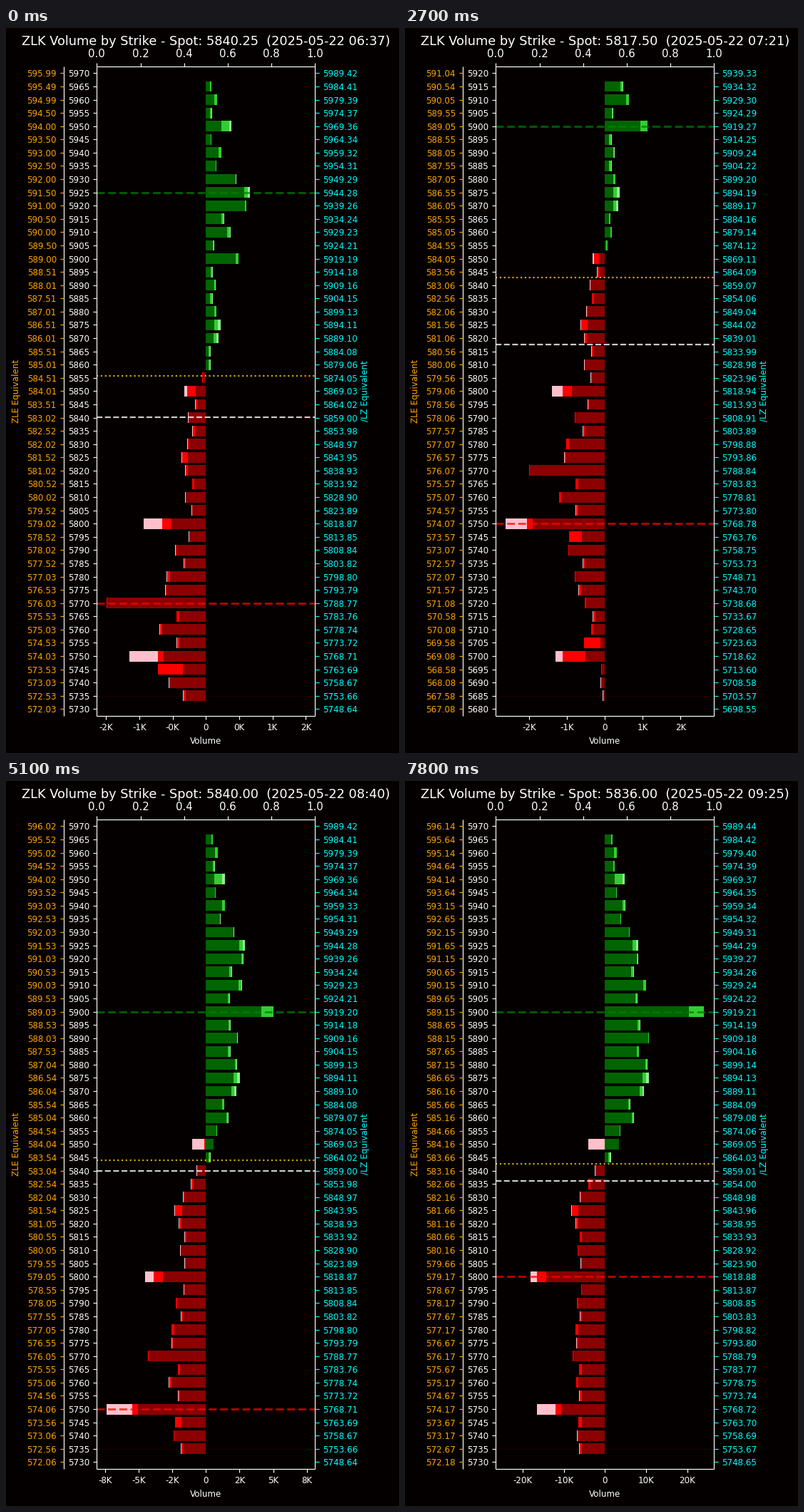
Animation of 551 by 1017 pixels, one loop 8 s. Source, as a matplotlib script:

```python
import matplotlib.pyplot as plt
import numpy as np
from matplotlib.animation import FuncAnimation
from matplotlib.collections import LineCollection, PolyCollection

W, H, DPI = 551, 1017, 128
PX = 72 / DPI                       # points per pixel
LEFT, RIGHT, TOP, BOTTOM = 127.3, 433.3, 54.1, 964.7
SIDE = 81.3                         # second axis on the left
ZERO, HALF = (LEFT + RIGHT) / 2, (RIGHT - LEFT) / 2
ROWS, GAP = 49, 5
ROW = (BOTTOM - TOP) / ROWS
TICK, PAD = 5.2, 10.4
SMALL, MEDIUM, LARGE = 11.89, 14.86, 17.83
BG = "#050000"
CALLS = ["darkgreen", "limegreen", "lightgreen"]
PUTS = ["darkred", "red", "pink"]
STEP_MS, TICK_MS, FRAMES = 300, 100, 80
CARRY = 19                          # future minus spot

# Market state at a few steps, linear in between
STEPS = (0, 5, 9, 15, 20, 23, 26)
MINUTES = (397, 422, 441, 510, 535, 550, 565)
SPOT = (5840.25, 5823.25, 5817.5, 5836.5, 5845.25, 5855, 5836)
FUND = (583.04, 581.44, 580.81, 582.65, 583.63, 584.53, 582.76)
FLIP = (5855.8, 5842.5, 5842.8, 5841.4, 5847.85, 5852.2, 5842.5)
PIVOT = (5857, 5852, 5852, 5847, 5838, 5839, 5843)
LIMIT = (1638, 2395, 2882, 4483, 13570, 19860, 26520)

# Middle and far parts of strikes with wider tips
TIPS = {5925: (5, 3), 5875: (5, 4), 5870: (4, 3), 5825: (9, 1)}

plt.rcParams["font.family"] = "DejaVu Sans"


def path(step, *points):
    return np.interp(step, *zip(*points))


def hump(x, centre, width):
    return np.exp(-((x - centre) / width) ** 2 / 2)


def smooth(x, start, end):
    t = np.clip((x - start) / (end - start), 0, 1)
    return t * t * (3 - 2 * t)


def window(spot):
    """Strikes from top to bottom, centred on the nearest fifty."""
    return 50 * round(spot / 50) + 120 - GAP * np.arange(ROWS)


def leaders(step):
    """Near, mid and far sizes of the most traded strikes."""
    return {
        5950: (path(step, (0, 22), (15, 11), (26, 14)), 11, 3),
        5900: (path(step, (0, 42), (9, 50), (15, 58), (20, 103), (23, 119)),
               4 + 0.7 * step, 0),
        5850: (path(step, (0, -14), (15, -4), (20, 32), (26, 20)),
               path(step, (0, -12), (15, -4), (20, 0)),
               path(step, (0, -5), (15, 0), (20, -42), (26, -24))),
        5800: (-path(step, (0, 49), (15, 46), (20, 78), (23, 84)),
               -13, -8 - 18 * np.exp(-step / 10)),
        5770: (3.6 * step - 139, -1, 0),
        5750: (-path(step, (0, 60), (5, 103), (15, 102), (23, 65), (26, 62)),
               -8, -path(step, (0, 40), (15, 24), (20, 51), (26, 27))),
        5745: (-33, -35 * np.exp(-step / 13), 0),
        5705: (-6, -24, 0),
        5700: (-28, -32, -10),
    }


def sizes(strike, step, pivot):
    """Sizes of an ordinary strike: calls above the pivot, puts below."""
    is_round = strike % 10 == 0 or strike % 25 == 0
    if strike > pivot:
        sign = 1
        early = (12 + 44 * hump(strike, 5922, 9)) * (1 if is_round else 0.5)
        late = (8 + 54 * hump(strike, 5893, 31)) * (1 if is_round else 0.75)
    else:
        sign = -1
        early = (24 + 38 * hump(strike, 5760, 24)) * (1 if is_round else 0.62)
        early *= np.clip((strike - 5680) / 50, 0, 1)
        late = 38 if is_round else 33
    near = early + (late - early) * smooth(step, 9, 23)
    near *= min(1, (abs(strike - pivot) + 3) / 18)
    noise = np.random.default_rng(strike).uniform((0.5, 0), (4, 1.2))
    mid, far = TIPS.get(strike, noise)
    return sign * near, sign * mid, sign * far


def nice_step(limit):
    """Smallest round step that gives at most eight intervals."""
    raw = 2 * limit / 8
    power = 10 ** np.floor(np.log10(raw))
    return next(m * power for m in (1, 2, 2.5, 5, 10) if m * power >= raw)


def stack(values):
    """Spans (start, end, colour) on either side of zero, plus both ends."""
    ends, spans = {True: 0, False: 0}, []
    for i, value in enumerate(values):
        if value:
            up = bool(value > 0)
            start = ends[up]
            ends[up] += value
            spans.append((start, ends[up], (CALLS if up else PUTS)[i]))
    return spans, ends[True], ends[False]


fig = plt.figure(figsize=(W / DPI, H / DPI), dpi=DPI, facecolor=BG)
ax = fig.add_axes([0, 0, 1, 1])
ax.set_xlim(0, W)
ax.set_ylim(H, 0)
ax.axis("off")


def label(x, y, text="", size=SMALL, color="white", ha="center",
          va="center_baseline", **kw):
    return ax.text(x, y, text, fontsize=size * PX, color=color,
                   ha=ha, va=va, **kw)


def segments(lines, color="white"):
    return ax.add_collection(LineCollection(
        lines, colors=color, linewidths=1.18 * PX, zorder=4))


def level(color, width, style, alpha):
    return ax.plot([LEFT, RIGHT], [0, 0], color=color, lw=width * PX, ls=style,
                   alpha=alpha, zorder=3, dash_capstyle="butt")[0]


row_y = TOP + ROW * (np.arange(ROWS) + 0.5)

ax.plot([LEFT, RIGHT], [row_y[-2]] * 2, color="#1c0000", lw=PX, zorder=1)
bars = ax.add_collection(PolyCollection([], linewidths=0, zorder=2))
call_wall = level("green", 2.96, "--", 0.7)
put_wall = level("red", 2.96, "--", 0.7)
spot_line = level("white", 2.2, "--", 0.8)
flip_line = level("gold", 2.2, ":", 0.8)

segments([[(LEFT, y), (RIGHT, y)] for y in (TOP, BOTTOM)]
         + [[(x, TOP), (x, BOTTOM)] for x in (SIDE, LEFT, RIGHT)])
for x, way, color in ((SIDE, -1, "orange"), (LEFT, -1, "white"), (RIGHT, 1, "cyan")):
    segments([[(x, y), (x + way * TICK, y)] for y in row_y], color)

fund_labels = [label(SIDE - PAD, y, color="orange", ha="right") for y in row_y]
strike_labels = [label(LEFT - PAD, y, ha="right") for y in row_y]
future_labels = [label(RIGHT + PAD, y, color="cyan", ha="left") for y in row_y]

top_x = np.linspace(LEFT, RIGHT, 6)
segments([[(x, TOP), (x, TOP - TICK)] for x in top_x])
for i, x in enumerate(top_x):
    label(x, TOP - PAD, f"{i / 5:.1f}", MEDIUM, va="bottom")

x_ticks = segments([])
x_labels = [label(ZERO, 985.4, va="baseline") for _ in range(9)]
label(ZERO, 1003.8, "Volume", va="baseline")
mid_y = (TOP + BOTTOM) / 2
label(15, mid_y, "ZLE Equivalent", color="orange", rotation=90, va="center")
label(504, mid_y, "/LZ Equivalent", color="cyan", rotation=90, va="center")
title = label(ZERO, 24.4, size=LARGE, va="baseline")


def draw_x_axis(limit):
    step = nice_step(limit)
    count = int(limit // step)
    values = step * np.arange(-count, count + 1)
    xs = ZERO + values / limit * HALF
    x_ticks.set_segments([[(x, BOTTOM), (x, BOTTOM + TICK)] for x in xs])
    for text in x_labels:
        text.set_text("")
    for text, x, value in zip(x_labels, xs, values):
        text.set_x(x)
        text.set_text(f"{value / 1000:.0f}K" if value else "0")


def update(frame):
    step = frame * TICK_MS // STEP_MS
    minutes, spot, fund, flip, pivot, limit = (
        np.interp(step, STEPS, track)
        for track in (MINUTES, SPOT, FUND, FLIP, PIVOT, LIMIT))
    minutes, spot = round(minutes), round(spot * 4) / 4
    strikes = window(spot)

    def y_of(price):
        return row_y[0] + (strikes[0] - price) / GAP * ROW

    inner = strikes[1:-1]
    lead = leaders(step)
    stacks = [stack(lead.get(s) or sizes(s, step, pivot)) for s in inner.tolist()]
    highs = [s[1] for s in stacks]
    lows = [s[2] for s in stacks]
    scale = HALF / 1.1 / max(max(highs), -min(lows))

    boxes, colors = [], []
    for y, (spans, _, _) in zip(row_y[1:-1], stacks):
        y0, y1 = y - 0.4 * ROW, y + 0.4 * ROW
        for start, end, color in spans:
            x0, x1 = ZERO + start * scale, ZERO + end * scale
            boxes.append([(x0, y0), (x1, y0), (x1, y1), (x0, y1)])
            colors.append(color)
    bars.set_verts(boxes)
    bars.set_facecolor(colors)

    for line, price in ((call_wall, inner[np.argmax(highs)]),
                        (put_wall, inner[np.argmin(lows)]),
                        (spot_line, spot), (flip_line, flip)):
        line.set_ydata([y_of(price)] * 2)

    for i, strike in enumerate(strikes):
        fund_labels[i].set_text(f"{strike * fund / spot:.2f}")
        strike_labels[i].set_text(f"{strike}")
        future_labels[i].set_text(f"{strike * (spot + CARRY) / spot:.2f}")
    draw_x_axis(limit)
    title.set_text(f"ZLK Volume by Strike - Spot: {spot:.2f}  "
                   f"(2025-05-22 {minutes // 60:02d}:{minutes % 60:02d})")
    return []


anim = FuncAnimation(fig, update, frames=FRAMES, init_func=lambda: update(0),
                     interval=TICK_MS, repeat=True, repeat_delay=0,
                     cache_frame_data=False)
plt.show()
```
